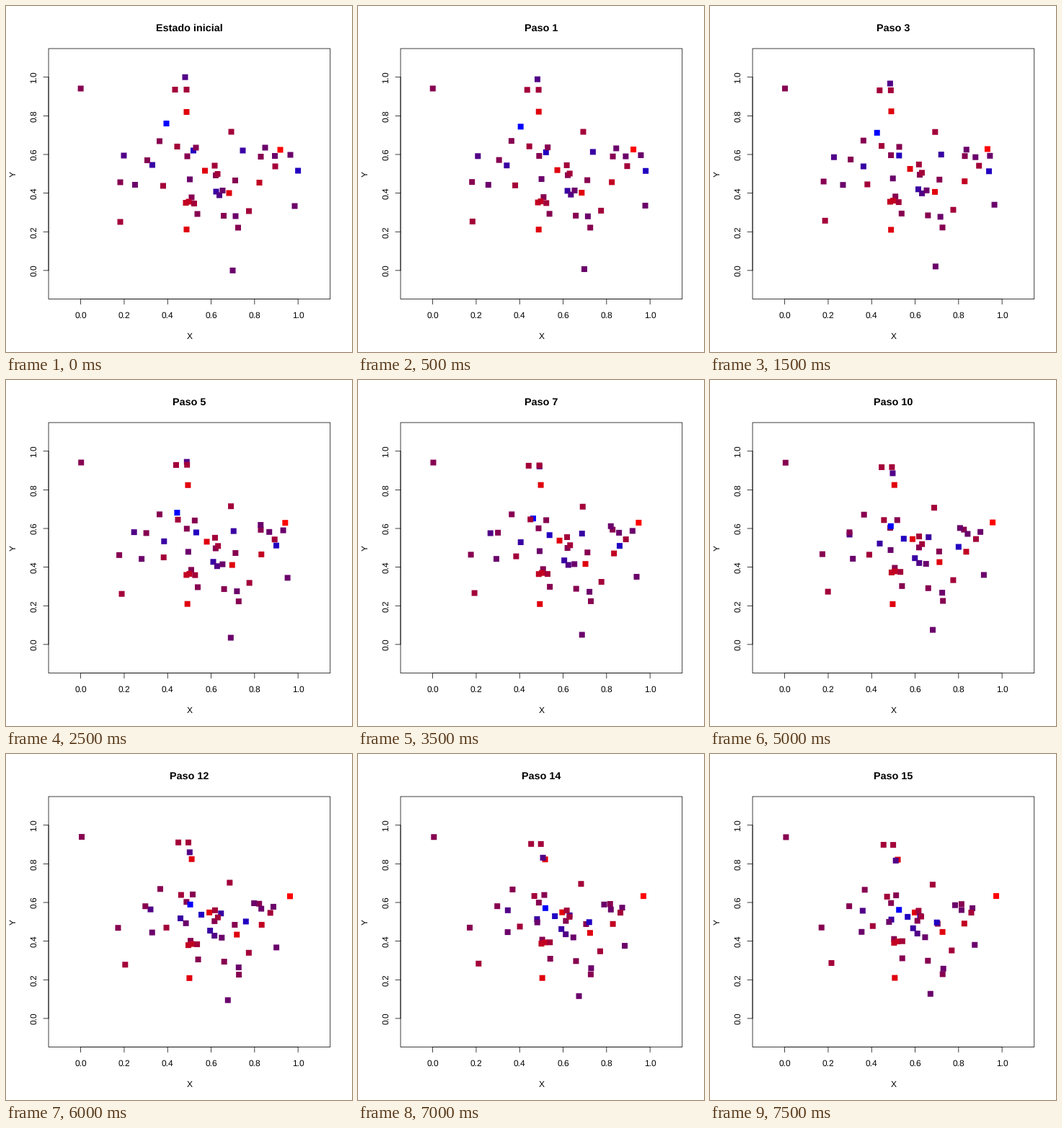
Animation of 480 by 480 pixels, one loop 8000 ms. Source, as a matplotlib script:

```python
import matplotlib.pyplot as plt
import numpy as np
from matplotlib.animation import FuncAnimation
from matplotlib.patches import Rectangle

SIZE, DPI = 480, 72
STEPS, STEP_MS = 16, 500
MAX_MOVE = 0.02
LEFT, TOP, RIGHT, BOTTOM = 59.04, 59.04, 449.76, 406.56
X_UNIT, Y_UNIT = (RIGHT - LEFT) / 1.296, (BOTTOM - TOP) / 1.296
X_ZERO, Y_ZERO = LEFT + 0.148 * X_UNIT, BOTTOM - 0.148 * Y_UNIT

plt.rcParams.update({
    "font.family": "Liberation Sans",
    "font.size": 12,
    "text.hinting": "none",
    "toolbar": "None",
})

# Charge -> starting places on the stage in pixels, back to front
CROWD = {
    1.00: [(380.5, 199.5)],
    0.80: [(250.5, 147), (276, 228.5), (309.5, 259.5), (250.5, 310)],
    0.17: [(103.5, 114.5), (213, 187.5), (251.5, 208.5), (353.5, 209),
           (318, 242), (265.5, 288.5), (302, 291), (322, 307.5)],
    -1.00: [(222.5, 163)],
    -0.68: [(260, 200.5), (405.5, 228.5)],
    -0.45: [(203, 220.5), (291.5, 257.5), (328.5, 200.5)],
    -0.23: [(248.5, 98.5), (163.5, 207.5), (296, 262.5)],
    -0.07: [(359.5, 196.5), (373, 208), (394.5, 206.5),
            (179, 248), (400.5, 277.5), (314.5, 367)],
    0.07: [(255, 240.5), (300.5, 256), (318.5, 291.5)],
    0.12: [(263.5, 196.5), (196, 214), (291, 235), (158.5, 244.5),
           (257.5, 265.5)],
    0.58: [(351.5, 245), (249.5, 273), (253.5, 271.5)],
    0.34: [(234.5, 116), (250.5, 116), (237.5, 195), (289.5, 221.5),
           (293.5, 233), (312.5, 174.5), (373.5, 222.5), (218, 249.5),
           (158.5, 299.5), (261, 274), (337, 284.5)],
}


def sx(v):
    return X_ZERO + v * X_UNIT


def sy(v):
    return Y_ZERO - v * Y_UNIT


def charge_color(q):
    t = (round(5 * q) + 5) / 10
    return t ** 1.25, 0, (1 - t) ** 1.25


def forces(pos):
    """Opposite charges attract, like charges repel."""
    gap = pos[None] - pos[:, None]
    dist = np.hypot(gap[..., 0], gap[..., 1]) + 0.001
    sign = np.where(np.outer(charge, charge) < 0, 1, -1)
    pull = sign * np.abs(charge[:, None] - charge) / dist
    return (gap * pull[..., None]).sum(axis=1)


def simulate(pos):
    """Positions at every step; the strongest force moves MAX_MOVE."""
    history = [pos]
    for _ in range(STEPS - 1):
        f = forces(pos)
        pos = np.clip(pos + f * MAX_MOVE / np.abs(f).max(), 0, 1)
        history.append(pos)
    return history


charge = np.array([q for q, spots in CROWD.items() for _ in spots])
spots = np.array([spot for group in CROWD.values() for spot in group])
start = np.column_stack([(spots[:, 0] - X_ZERO) / X_UNIT,
                         (Y_ZERO - spots[:, 1]) / Y_UNIT])
history = simulate(np.clip(start, 0, 1))

fig = plt.figure(figsize=(SIZE / DPI, SIZE / DPI), dpi=DPI, facecolor="white")
ax = fig.add_axes([0, 0, 1, 1])
ax.set_xlim(0, SIZE)
ax.set_ylim(SIZE, 0)
ax.axis("off")

PEN = dict(lw=0.75, snap=False)


def line(x0, y0, x1, y1):
    ax.plot([x0, x1], [y0, y1], color="black", solid_capstyle="round", **PEN)


def label(x, y, text, **style):
    return ax.text(x, y, text, ha="center", va="baseline",
                   rotation_mode="anchor", color="black", **style)


def place(step):
    x, y = history[step].T
    return np.column_stack([sx(x), sy(y)])


squares = ax.scatter(*place(0).T, s=64, marker="s", linewidths=0, snap=False,
                     c=[charge_color(q) for q in charge], zorder=3)

ax.add_patch(Rectangle((LEFT, TOP), RIGHT - LEFT, BOTTOM - TOP,
                       fill=False, ec="black", **PEN))
line(sx(0), BOTTOM, sx(1), BOTTOM)
line(LEFT, sy(0), LEFT, sy(1))
for v in np.arange(6) / 5:
    line(sx(v), BOTTOM, sx(v), BOTTOM + 7.2)
    line(LEFT, sy(v), LEFT - 7.2, sy(v))
    label(sx(v), 432.9, f"{v:.1f}")
    label(42, sy(v), f"{v:.1f}", rotation=90)

mid_x, mid_y = (LEFT + RIGHT) / 2, (TOP + BOTTOM) / 2
label(mid_x, 461.7, "X")
label(13.6, mid_y, "Y", rotation=90)
title = label(mid_x, 35, "", size=14.4, weight="bold")


def draw(step):
    squares.set_offsets(place(step))
    title.set_text(f"Paso {step}" if step else "Estado inicial")
    return squares, title


anim = FuncAnimation(fig, draw, frames=STEPS, interval=STEP_MS,
                     repeat=True, repeat_delay=0)
plt.show()
```
